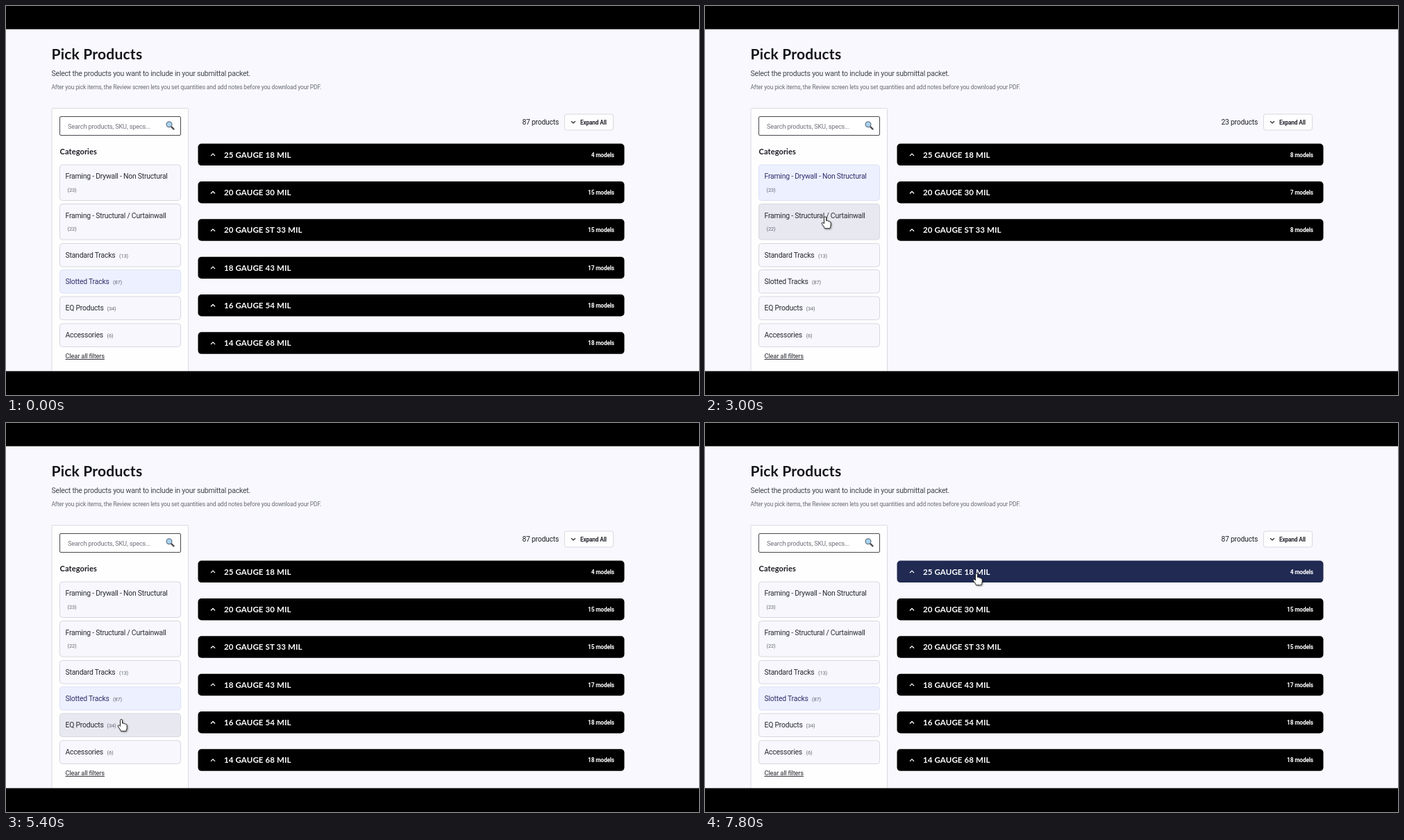
Write an HTML page that moves like this. It is 998x561 px and loops after 8 s.

```html
<!DOCTYPE html>
<html lang="en">
<head>
<meta charset="utf-8">
<title>Pick Products</title>
<style>
  html, body { margin: 0; width: 100%; height: 100%; overflow: hidden; background: #000; }
  svg { display: block; width: 100vw; height: 100vh; }
  text { font-family: Roboto, sans-serif; letter-spacing: -.02em; white-space: pre; }
  .display { font-family: Lato, sans-serif; font-weight: 700; letter-spacing: .01em; }
  .bold { font-weight: 700; }
  .end { text-anchor: end; }
  #cursor { filter: drop-shadow(1px 1px 1px #0006); }
</style>
</head>
<body>
<svg viewBox="0 0 998 561">
  <rect y="33.5" width="998" height="493.5" fill="#f8f8fe"/>
  <g id="page"></g>
  <g id="content"></g>
  <rect y="526.6" width="998" height="35"/>
  <g id="cursor" fill="#fff" stroke="#222" stroke-width="1" stroke-linejoin="round">
    <path id="hand" d="M-1.5 9V1.3Q-1.5 0 0 0T1.5 1.3V5.6Q3.6 4.6 4 6.3Q6 5.4 6.4 7.2Q8.2 6.8 8.2 8.8V12Q8 14.5 6.8 16.8H-.5Q-1.6 14-4.6 10.4Q-5.4 8.5-3.8 8.4Q-2.6 8.4-1.5 10Z"/>
    <path id="arrow" d="M0 0V14L3.3 11L5.6 16L7.6 15L5.4 10.3H10Z"/>
  </g>
</svg>
<script>
const LOOP = 8000, STEP = 200;
const $ = id => document.getElementById(id);

const gauges = ['25 GAUGE 18 MIL', '20 GAUGE 30 MIL', '20 GAUGE ST 33 MIL',
  '18 GAUGE 43 MIL', '16 GAUGE 54 MIL', '14 GAUGE 68 MIL'];

// models: [gauge index, count]; countX is where the item count starts
const all = counts => counts.map((n, i) => [i, n]);
const categories = [
  { name: 'Framing - Drywall - Non Structural', total: 23, y: 229, h: 51.5, models: all([8, 7, 8]) },
  { name: 'Framing - Structural / Curtainwall', total: 22, y: 285.5, h: 51.5, models: [[2, 22]] },
  { name: 'Standard Tracks', total: 13, y: 342.5, h: 33.5, countX: 163, models: all([4, 4, 5]) },
  { name: 'Slotted Tracks', total: 87, y: 380.5, h: 33.5, countX: 154, models: all([4, 15, 15, 17, 18, 18]) },
  { name: 'EQ Products', total: 34, y: 419, h: 33.5, countX: 145.5, models: all([11, 11, 12]) },
  { name: 'Accessories', total: 6, y: 458, h: 33.5, countX: 145.5, models: [] },
];

// [time, selected category]
const clicks = [[0, 3], [2400, 0], [3400, 1], [4200, 2], [4800, 3], [5800, 4], [6600, 3]];

// [time, x, y] of the pointer tip
const path = [[200, 830, 36], [1200, 262, 185], [2200, 183, 250.5], [2400, 182, 252],
  [3000, 173, 304], [3400, 173, 304], [4000, 169, 354], [4200, 168, 362], [4400, 167, 383],
  [4800, 167, 394], [5400, 166, 427.5], [5800, 166, 427.5], [6600, 172, 402],
  [7800, 391, 217], [8000, 391, 217]];

const text = (x, y, size, fill, str, cls = '') =>
  `<text x="${x}" y="${y}" font-size="${size}" fill="${fill}" class="${cls}">${str}</text>`;
const box = (x, y, w, h, r, fill, stroke = 'none') =>
  `<rect x="${x}" y="${y}" width="${w}" height="${h}" rx="${r}" fill="${fill}" stroke="${stroke}"/>`;
const chevron = (x, y, dy, color) =>
  `<path d="M${x - 3} ${y + dy}L${x} ${y - dy}L${x + 3} ${y + dy}" fill="none" stroke="${color}" stroke-width="1.3"/>`;

$('page').innerHTML =
  text(65.5, 76.5, 21, '#15161c', 'Pick Products', 'display') +
  text(65.5, 100.5, 10.5, '#44464f', 'Select the products you want to include in your submittal packet.') +
  text(65.5, 120, 8.5, '#6a6c76', 'After you pick items, the Review screen lets you set quantities and add notes before you download your PDF.') +
  box(66, 147.5, 196.5, 390, 1, '#fefefe', '#dadae2') +
  box(77.5, 159.5, 174, 27, 1.5, '#fff', '#4a4a50') +
  text(89, 177, 9.25, '#70717b', 'Search products, SKU, specs...') +
  '<path d="M238 174L241.5 177.5" stroke="#50454a" stroke-width="2.4" stroke-linecap="round"/>' +
  '<circle cx="235" cy="170.8" r="3.9" fill="#a9d3ee" stroke="#66788a" stroke-width="1.3"/>' +
  text(77.5, 213.5, 11, '#1b1c24', 'Categories', 'display') +
  text(85.5, 508, 9.35, '#24252d', '<tspan text-decoration="underline">Clear all filters</tspan>') +
  box(804.5, 156, 70, 23, 3, '#fefefe', '#d9d9e1') +
  chevron(817, 167.5, -1.3, '#333') +
  text(827, 170.8, 8.3, '#26272f', 'Expand All', 'bold');

function categoryItem(cat, selected, hovered, showCount) {
  const fill = selected ? '#edf0fe' : hovered ? '#e8e8f0' : '#f7f7fd';
  const tall = !cat.countX;
  return box(77.5, cat.y, 174, cat.h, 4, fill, selected ? '#dce1f3' : '#d7d7e0') +
    text(85.5, cat.y + 20.3, 10.4, selected && showCount ? '#302f6c' : '#292a33', cat.name) +
    (showCount ? text(cat.countX ?? 88.5, cat.y + (tall ? 38.5 : 20.3), 7.5, '#666873', `(${cat.total})`) : '');
}

const bar = { x: 276.5, w: 614, h: 31.5, y: row => 198.6 + row * 54.35 };

function productBar([gauge, count], row, hovered) {
  const y = bar.y(row);
  return box(bar.x, y, bar.w, bar.h, 5, hovered ? '#202a52' : '#000') +
    chevron(298, y + 16, 1.5, '#fff') +
    text(314, y + 20, 11.5, '#fff', gauges[gauge], 'display') +
    text(876, y + 19, 8.4, '#fff', `${count} models`, 'bold end');
}

function pointerAt(t) {
  const next = path.findIndex(p => p[0] > t);
  if (next < 1) return null;
  const [t0, x0, y0] = path[next - 1], [t1, x1, y1] = path[next];
  const u = (t - t0) / (t1 - t0), ease = u * u * (3 - 2 * u);
  return { x: x0 + (x1 - x0) * ease, y: y0 + (y1 - y0) * ease };
}

function draw(t) {
  const [clickedAt, selected] = clicks.findLast(c => c[0] <= t);
  const current = categories[selected];
  const pointer = pointerAt(t);
  const over = (x, y, w, h) => !!pointer && pointer.x >= x && pointer.x <= x + w &&
    pointer.y >= y && pointer.y <= y + h;
  const hotItem = categories.findIndex(c => over(77.5, c.y, 174, c.h));
  const hotBar = current.models.findIndex((_, row) => over(bar.x, bar.y(row), bar.w, bar.h));
  const settling = clickedAt === 6600 && t < 6800;

  $('content').innerHTML =
    categories.map((c, i) => categoryItem(c, i === selected, i === hotItem, !(settling && i === selected))).join('') +
    text(796, 171, 10.3, '#202129', `${current.total} products`, 'end') +
    current.models.map((m, row) => productBar(m, row, row === hotBar)).join('');

  $('cursor').style.display = pointer ? '' : 'none';
  if (!pointer) return;
  const clickable = hotItem >= 0 || hotBar >= 0;
  $('cursor').setAttribute('transform', `translate(${pointer.x} ${pointer.y})`);
  $('hand').style.display = clickable ? '' : 'none';
  $('arrow').style.display = clickable ? 'none' : '';
}

let start, shown;
function tick(now) {
  start ??= now;
  const t = Math.floor(((now - start) % LOOP) / STEP) * STEP;
  if (t !== shown) draw(shown = t);
  requestAnimationFrame(tick);
}
draw(shown = 0);
requestAnimationFrame(tick);
</script>
</body>
</html>
```
